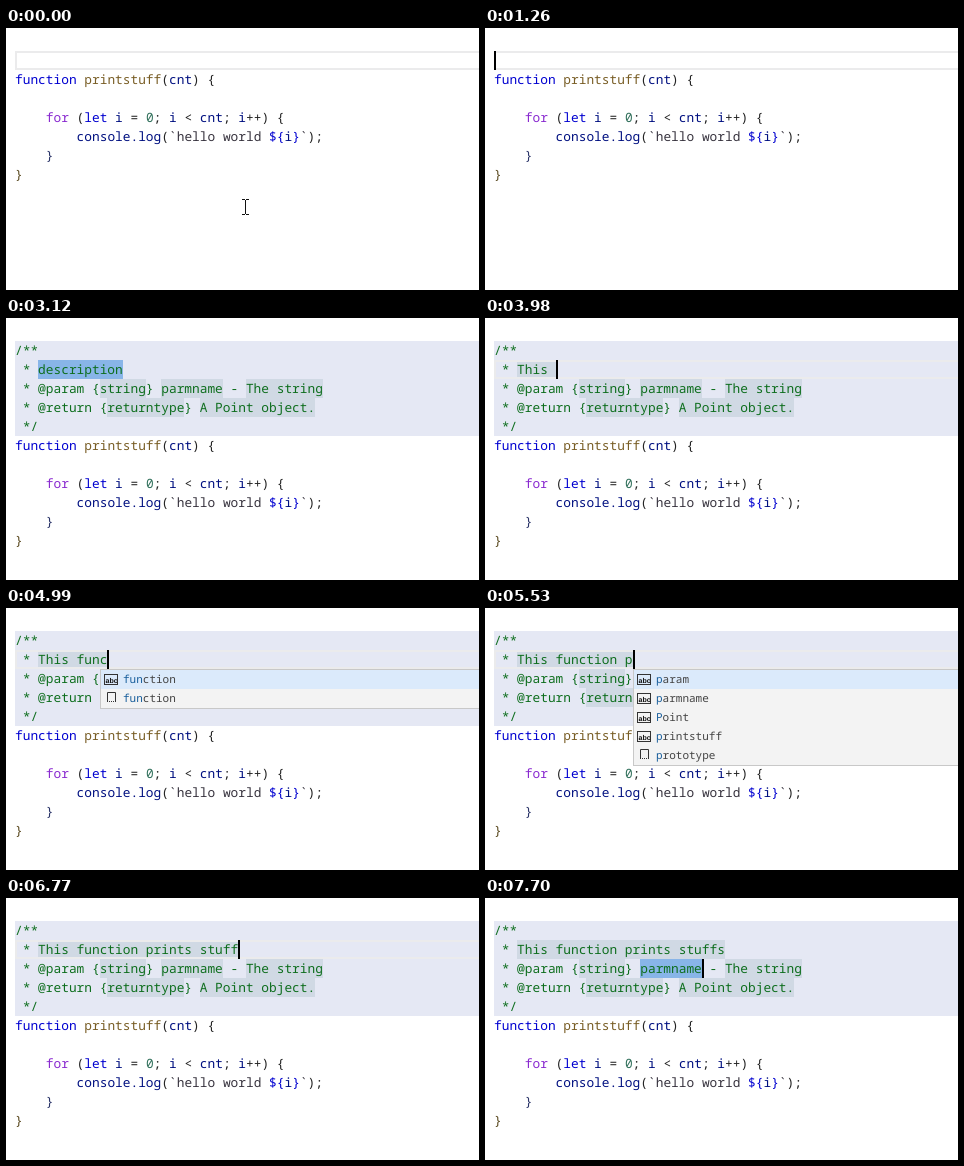
An HTML page with a canvas that plays this animation: 473x262 px, repeating every 8 s.

```html
<!DOCTYPE html>
<html lang="en">
<head>
<meta charset="utf-8">
<title>Snippet completion in a code editor</title>
<style>
html, body { margin: 0; overflow: hidden; background: #fff; }
canvas { display: block; }
</style>
</head>
<body>
<canvas id="stage" width="473" height="262"></canvas>
<script>
const ctx = document.getElementById('stage').getContext('2d');
const LOOP = 8000, LEFT = 9, TOP = 23, LINE = 19, CHAR = 7.7;
const CODE_FONT = '12.833px "Noto Sans Mono", monospace';
const LIST_FONT = '11px "Noto Sans Mono", monospace';
const DETAIL_FONT = '11.55px "Open Sans", sans-serif';

const BLUE = '#0000d0', PURPLE = '#8a2bd0', BROWN = '#795e26', NAVY = '#001080',
      DARK = '#222', GREEN = '#0e6e1e', TEXT = '#38343f';

const CODE = [
  [['function ', BLUE], ['printstuff', BROWN], ['(', DARK], ['cnt', NAVY], [') {', DARK]],
  [],
  [['    ', DARK], ['for ', PURPLE], ['(', DARK], ['let ', BLUE], ['i ', NAVY], ['= ', DARK], ['0', '#2f6f5a'],
   ['; ', DARK], ['i ', NAVY], ['< ', DARK], ['cnt', NAVY], ['; ', DARK], ['i', NAVY], ['++) {', DARK]],
  [['        ', DARK], ['console.log', NAVY], ['(', DARK], ['`hello world ', TEXT], ['${', BLUE], ['i', NAVY],
   ['}', BLUE], ['`', TEXT], [');', DARK]],
  [['    }', '#2a3468']],
  [['}', '#5a4a20']]
];

// Key presses: '<' is backspace.
const KEYS_A = { text: 'jsdoc', times: [1410, 1580, 1730, 2040, 2430] };
const KEYS_B = {
  text: 'This fn<unction prints stuffs',
  times: [3670, 3750, 3830, 3900, 3980, 4210, 4360, 4680, 4760, 4910, 4990, 5060, 5140, 5220, 5290,
          5450, 5530, 5600, 5680, 5830, 5910, 5990, 6140, 6310, 6460, 6540, 6690, 6770, 6920]
};

// Completion lists: 's' marks a snippet, 'w' a plain word.
const DOC = 's jsdoc-func|s jsdoc-func-noret', FUNC = 'w function|s function';
const POPUPS = [ // time, column, matched letters, entries
  [0], [1580, 2, 2, DOC + '|s jsdoc-class'], [1810, 3, 3, DOC], [2110, 4, 4, DOC], [2510, 5, 5, DOC], [2660],
  [3830, 6, 3, 'w this|s this'], [3980],
  [4210, 9, 1, 'w for|w function|s for|s foreach|s forin|s function'],
  [4360, 10, 1, FUNC], [4680, 9, 1, 'w for|w function|s for|s foreach|s forin|s function'],
  [4830, 10, 2, FUNC], [4910, 11, 3, FUNC], [5060, 12, 4, FUNC], [5140, 13, 5, FUNC],
  [5220, 14, 6, FUNC], [5290, 15, 7, FUNC], [5370, 16, 8, FUNC], [5450],
  [5530, 18, 1, 'w param|w parmname|w Point|w printstuff|s prototype'],
  [5600, 19, 2, 'w printstuff|s prototype'], [5760, 20, 3, 'w printstuff'], [5910, 22, 5, 'w printstuff'],
  [6060, 23, 6, 'w printstuff'], [6140],
  [6310, 25, 1, 'w string|s setinterval|s settimeout|s static|s switch'],
  [6460, 26, 2, 'w string|s static'], [6610]
];

const colX = col => Math.round(LEFT + col * CHAR);
const rowY = row => TOP + row * LINE;

function typed({ text, times }, t) {
  let out = '';
  times.forEach((time, i) => {
    if (time <= t) out = text[i] === '<' ? out.slice(0, -1) : out + text[i];
  });
  return out;
}

function rect(x, y, w, h, color) {
  ctx.fillStyle = color;
  ctx.fillRect(x, y, w, h);
}

function label(text, x, y, color, font = CODE_FONT) {
  ctx.font = font;
  ctx.fillStyle = color;
  ctx.fillText(text, x, y);
}

function codeText(text, col, row, color) {
  label(text, LEFT + col * CHAR, rowY(row) + 14, color);
}

function mark(row, col, length, color = '#d0d9e4') {
  rect(colX(col), rowY(row), colX(col + length) - colX(col), LINE, color);
}

function currentLine(row) {
  ctx.strokeStyle = '#ebebec';
  ctx.lineWidth = 2;
  ctx.strokeRect(LEFT + 1, rowY(row) + 1, 480, LINE - 2);
}

function drawCode(firstRow) {
  CODE.forEach((line, i) => {
    let col = 0;
    for (const [text, color] of line) {
      codeText(text, col, firstRow + i, color);
      col += text.length;
    }
  });
}

function drawComment(t) {
  const typing = t >= 3670;
  const description = typing ? typed(KEYS_B, t) : 'description';
  rect(LEFT, TOP, 464, 5 * LINE, '#e5e8f4');
  mark(1, 3, description.length);
  mark(2, 11, 6);
  mark(2, 19, 8);
  mark(2, 30, 10);
  mark(3, 12, 10);
  mark(3, 24, 15);
  const selection = !typing ? [1, 3, 11] : t >= 7700 ? [2, 19, 8] : t >= 7240 ? [2, 11, 6] : null;
  if (selection) mark(...selection, '#88b5e8');
  else currentLine(1);
  ['/**', ' * ' + description, ' * @param {string} parmname - The string',
   ' * @return {returntype} A Point object.', ' */'].forEach((line, row) => codeText(line, 0, row, GREEN));
  return selection ? [selection[0], selection[1] + selection[2]] : [1, 3 + description.length];
}

function drawIcon(kind, x, y) {
  ctx.strokeStyle = '#333';
  ctx.lineWidth = 1;
  if (kind === 'w') {
    ctx.strokeRect(x + 4.5, y + 4.5, 13, 10);
    label('abc', x + 5.5, y + 12.5, '#111', 'bold 7px "Liberation Sans", sans-serif');
    return;
  }
  ctx.beginPath();
  ctx.moveTo(x + 7.5, y + 12);
  ctx.lineTo(x + 7.5, y + 3.5);
  ctx.lineTo(x + 15.5, y + 3.5);
  ctx.lineTo(x + 15.5, y + 12);
  ctx.stroke();
  for (let i = 0; i < 5; i++) rect(x + 7 + i * 2, y + 12, 1, 1, '#333');
}

function drawPopup(t, row) {
  const [, col, matched, entries] = POPUPS.filter(p => p[0] <= t).pop();
  if (!entries) return;
  const items = entries.split('|'), detailed = t < 2660;
  const firstHeight = detailed ? 35 : LINE;
  const x = colX(col), top = rowY(row + 1), height = firstHeight + (items.length - 1) * LINE + 2;
  rect(x, top, 440, height, '#c8c8c8');
  rect(x + 1, top + 1, 438, height - 2, '#f3f3f3');
  rect(x + 1, top + 1, 438, firstHeight, '#dbeafb');
  items.forEach((item, i) => {
    const y = top + 1 + (i ? firstHeight + (i - 1) * LINE : 0);
    const name = item.slice(2), textX = x + 23;
    drawIcon(item[0], x, y);
    label(name.slice(0, matched), textX, y + 13, '#1a5f9c', LIST_FONT);
    label(name.slice(matched), textX + matched * 6.6, y + 13, '#444', LIST_FONT);
  });
  if (detailed) {
    label('A JSDoc comment for a function', x + 23, top + 31, '#b03038', DETAIL_FONT);
    ctx.fillStyle = '#62acd2';
    ctx.beginPath();
    ctx.arc(x + 422, top + 26, 6, 0, 7);
    ctx.fill();
    rect(x + 421, top + 22, 2, 2, '#fff');
    rect(x + 421, top + 25, 2, 5, '#fff');
  }
}

function drawPointer(x, y) {
  rect(x, y - 7, 1, 14, '#111');
  for (const edge of [y - 8, y + 7]) {
    rect(x - 3, edge, 3, 1, '#111');
    rect(x + 1, edge, 3, 1, '#111');
  }
}

function draw(t) {
  rect(0, 0, 473, 262, '#fff');
  const expanded = t >= 2660;
  let caret;
  if (expanded) {
    caret = drawComment(t);
  } else {
    const prefix = typed(KEYS_A, t);
    currentLine(0);
    codeText(prefix, 0, 0, NAVY);
    caret = [0, prefix.length];
  }
  drawCode(expanded ? 5 : 1);
  const [row, col] = caret;
  if (t >= 1260 && !(t >= 3120 && t < 3670)) rect(colX(col), rowY(row), 2, LINE, '#000');
  drawPopup(t, row);
  if (t < 70) drawPointer(239, 179);
  const step = Math.floor((t - 320) / 77);
  if (step >= 0 && step < 7) drawPointer(39 - step * 6, 86 - step * 13);
}

ctx.textRendering = 'geometricPrecision';
const start = performance.now();
function tick() {
  draw((performance.now() - start) % LOOP);
  requestAnimationFrame(tick);
}
tick();
</script>
</body>
</html>
```
